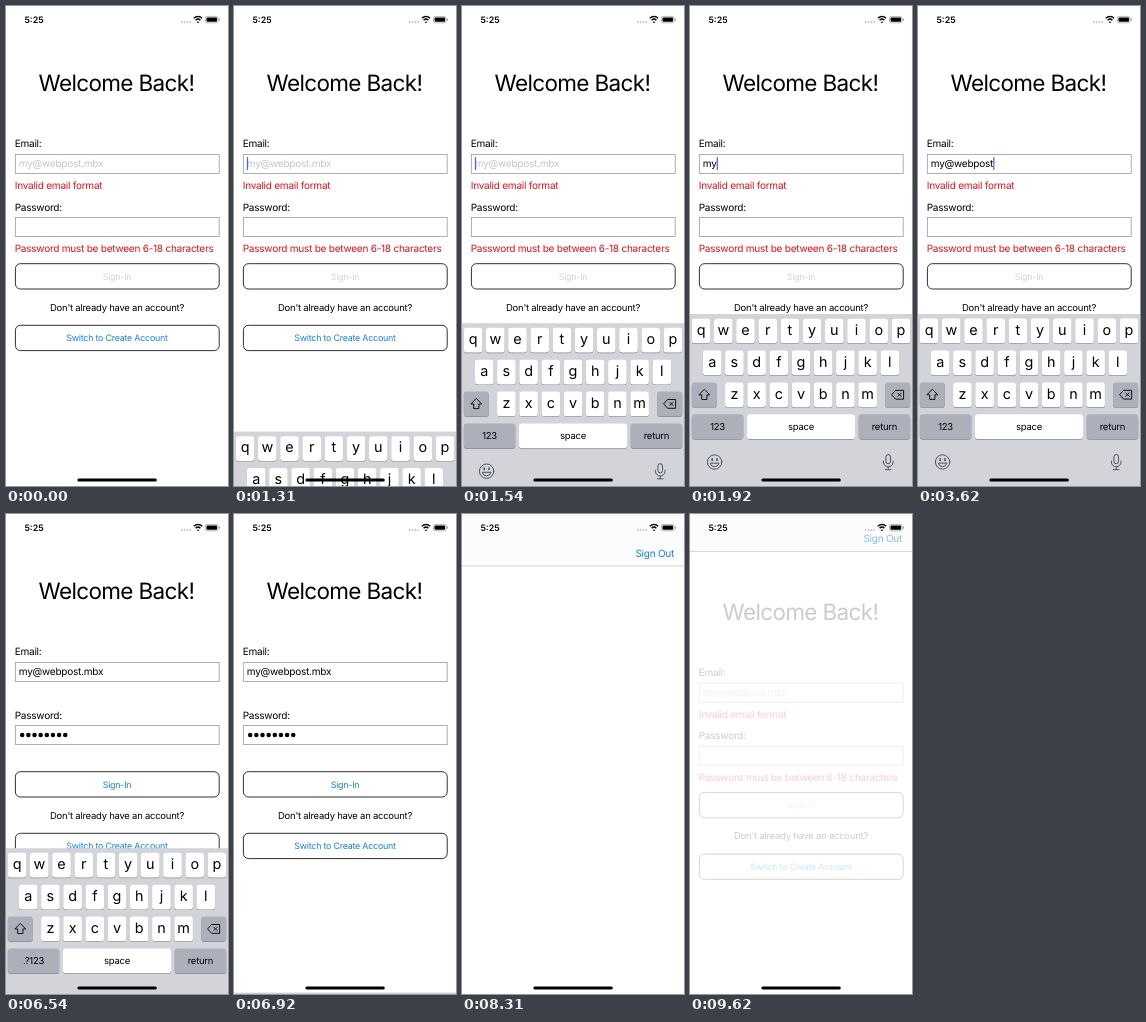
Animation, 222 px wide and 480 px high, one loop 9.7 s. Source, as an HTML page:

```html
<!DOCTYPE html>
<html lang="en">
<head>
<meta charset="utf-8">
<title>Sign-in form</title>
<style>
  html, body { margin: 0; width: 100%; height: 100%; overflow: hidden; background: #fff; }
  svg { display: block; width: 222px; height: 480px; }
  text {
    font: 10.06px Inter, sans-serif; letter-spacing: -.025em;
    white-space: pre; text-rendering: geometricPrecision;
  }
  .mid { text-anchor: middle; }
  .title { font-size: 22.5px; letter-spacing: -.029em; }
  .note { font-size: 9.47px; }
  .button { font-size: 8.88px; }
  .clock { font-size: 8.9px; font-weight: 600; letter-spacing: 0; }
  .letter { font-size: 14.4px; letter-spacing: 0; }
  .error { fill: #d8141e; }
  .blue { fill: #1580e0; }
  .field { fill: #fff; stroke: #a6a6a6; stroke-width: .9; }
  .outline { fill: #fff; stroke: #1a1a1a; stroke-width: .9; }
  .icon { fill: none; stroke: #111; stroke-width: 1; stroke-linejoin: round; }
  .tool { stroke: #50555c; stroke-linecap: round; }
</style>
</head>
<body>
<svg viewBox="0 0 222 480">
  <g id="form">
    <text class="title mid" x="110.4" y="85">Welcome Back!</text>
    <text x="8.7" y="141.3">Email:</text>
    <rect class="field" x="9.4" y="148.5" width="203.8" height="19"/>
    <text id="hint" x="12.8" y="161.2" fill="#c4c4c6"></text>
    <text id="email" x="12.8" y="161.2"></text>
    <text id="emailError" class="error" x="8.7" y="182.8">Invalid email format</text>
    <text x="8.7" y="204.5">Password:</text>
    <rect class="field" x="9.4" y="211.5" width="203.8" height="19"/>
    <g id="dots"></g>
    <text id="lastChar" y="224.3"></text>
    <text id="passError" class="error" x="8.7" y="245.8">Password must be between 6-18 characters</text>
    <rect class="outline" x="9.4" y="257.7" width="203.8" height="25.3" rx="5"/>
    <text id="signIn" class="button mid" x="111" y="273.6">Sign-In</text>
    <text class="note mid" x="111" y="304.7">Don't already have an account?</text>
    <rect class="outline" x="9.4" y="319.3" width="203.8" height="25.3" rx="5"/>
    <text class="button mid blue" x="111" y="335.2">Switch to Create Account</text>
    <g id="spinner" stroke="#777" stroke-width="2" stroke-linecap="round"></g>
    <rect id="caret" width="1.2" height="13" rx=".5" fill="#4468e0"/>
  </g>
  <g id="bar">
    <rect y="-40" width="222" height="92" fill="#fcfcfc"/>
    <path d="M0 52.2H222" stroke="#c6c6c8" stroke-width=".8"/>
    <text id="signOut" class="blue" x="173.4" y="43.2">Sign Out</text>
  </g>
  <text class="clock mid" x="28" y="16.8">5:25</text>
  <path d="M175 16h10" stroke="#aaa" stroke-width="1.3" stroke-dasharray="1.3 1.5"/>
  <g fill="none" stroke="#000">
    <path d="M187.9 12.3a5.8 5.8 0 0 1 8.2 0M189.6 14.2a3.4 3.4 0 0 1 4.8 0" stroke-width="1.5"/>
    <path d="M192 17.3l-1.2-1.3a1.7 1.7 0 0 1 2.4 0z" fill="#000" stroke="none"/>
    <rect x="199.4" y="10.4" width="12.8" height="6.4" rx="1.9" stroke="#999" stroke-width=".7"/>
    <rect x="200.5" y="11.5" width="10.6" height="4.2" rx="1" fill="#000" stroke="none"/>
    <path d="M213.5 12.6v2" stroke="#999"/>
  </g>
  <g id="keyboard"></g>
  <rect x="71.4" y="472.5" width="79.4" height="3" rx="1.5"/>
</svg>
<script>
const LOOP = 9700, ADDRESS = 'my@webpost.mbx', SECRET = 'password';
const FOCUS_EMAIL = 1150, FOCUS_PASS = 4380, SUBMIT = 7460, SIGN_OUT = 9500;
const DOT_PITCH = 6.15;
const emailTimes = [1770, 1920, 2230, 2540, 2690, 2920, 3080, 3230, 3380, 3540, 3690, 3770, 3850, 4000];
const passTimes = [4620, 4850, 5000, 5230, 5460, 5690, 5850, 6000];
const $ = id => document.getElementById(id);

// Critically damped spring from 0 to 1, as used for keyboard and bar
const spring = ms => {
  const x = Math.max(0, ms) * .0153;
  return 1 - (1 + x) * Math.exp(-x);
};
const smooth = x => {
  x = Math.min(1, Math.max(0, x));
  return x * x * (3 - 2 * x);
};
const typed = (times, t) => times.filter(s => s <= t).length;
const show = (id, on) => $(id).setAttribute('visibility', on ? 'visible' : 'hidden');
const moveY = (id, y) => $(id).setAttribute('transform', `translate(0 ${y.toFixed(2)})`);

function key(x, row, width, label = '', gray = false, id = '') {
  const y = 312.6 + 31.9 * row, single = label.length === 1;
  const box = (dy, fill) => `<rect x="${x}" y="${y + dy}" width="${width}" height="24.7" rx="2.9" fill="${fill}"/>`;
  return box(.7, '#898b90') + box(0, gray ? '#abb0ba' : '#fff') +
    `<text ${id && `id="${id}"`} class="mid ${single ? 'letter' : 'note'}" x="${x + width / 2}" y="${y + (single ? 16.2 : 15.5)}">${label}</text>`;
}

function buildKeyboard() {
  const rows = ['qwertyuiop', 'asdfghjkl', 'zxcvbnm'], starts = [1.8, 12.9, 35.1];
  const letters = rows.map((row, r) =>
    [...row].map((c, i) => key(starts[r] + 22.2 * i, r, 18.6, c)).join('')).join('');
  $('keyboard').innerHTML = '<rect y="308" width="222" height="172" fill="#d2d4da"/>' + letters +
    key(1.8, 2, 25, '', true) + key(195.2, 2, 25, '', true) +
    key(1.8, 3, 51.5, '123', true, 'modeKey') + key(57, 3, 108, 'space') + key(168.7, 3, 51.5, 'return', true) +
    `<path class="icon" d="M14.3 383.2l5.4 5.6h-2.8v4.6h-5.2v-4.6h-2.8z
      M201.6 388.7l4-4.4h8v8.8h-8zM207.6 386.8l3.8 3.8m0-3.8l-3.8 3.8"/>
    <g id="tools" class="icon tool"><circle cx="24.6" cy="456" r="7.2"/>
      <path d="M20.3 457.5a4.5 4.5 0 0 0 8.6 0z"/><path d="M22.2 452.8v1.6m4.8-1.6v1.6" stroke-width="1.6"/>
      <rect x="195.9" y="448.5" width="4.6" height="9.2" rx="2.3"/>
      <path d="M193.4 455v1a4.8 4.8 0 0 0 9.6 0v-1M198.2 460.8v2.8m-2.8 0h5.6"/></g>`;
}

function render(t) {
  const reset = t >= SIGN_OUT;
  const emailCount = reset ? 0 : typed(emailTimes, t);
  const passCount = reset ? 0 : typed(passTimes, t);

  $('email').textContent = ADDRESS.slice(0, emailCount);
  show('hint', !emailCount);
  show('emailError', emailCount < 13);

  const dots = passCount && t < 6380 ? passCount - 1 : passCount;
  [...$('dots').children].forEach((dot, i) => dot.setAttribute('visibility', i < dots ? 'visible' : 'hidden'));
  $('lastChar').textContent = SECRET.slice(dots, passCount);
  $('lastChar').setAttribute('x', 12.9 + DOT_PITCH * dots);
  show('passError', passCount < 6);
  $('signIn').setAttribute('fill', passCount >= 6 && t < SUBMIT ? '#1580e0' : '#d2d2d4');

  const onPass = t >= FOCUS_PASS;
  show('caret', t >= FOCUS_EMAIL && t < 6540);
  $('caret').setAttribute('y', onPass ? 214 : 151);
  $('caret').setAttribute('x', onPass
    ? 12.9 + DOT_PITCH * dots + (passCount > dots ? $('lastChar').getComputedTextLength() : 0)
    : 12.9 + (emailCount ? $('email').getComputedTextLength() : 0));

  moveY('keyboard', 172.5 * (1 - spring(t - 1236) + spring(t - 6496)));
  $('modeKey').textContent = onPass ? '.?123' : '123';
  show('tools', !onPass);

  show('spinner', t >= SUBMIT && !reset);
  const step = Math.max(0, Math.floor((t - 7610) / 80));
  $('spinner').setAttribute('transform', `translate(110.6 239.6) rotate(${45 * step})`);

  const back = smooth((t - 9520) / 350);
  $('form').setAttribute('opacity', reset ? back : 1 - smooth((t - 7900) / 350));
  moveY('form', reset ? 26 * (1 - back) : 0);

  const bar = spring(t - 7876) - spring(t - 9496);
  moveY('bar', 26 * (bar - 1));
  $('bar').setAttribute('opacity', Math.min(1, 2 * bar));
  $('signOut').setAttribute('opacity', t >= 9310 ? .6 : 1);
}

buildKeyboard();
$('hint').textContent = ADDRESS;
$('dots').innerHTML = [...SECRET].map((_, i) =>
  `<circle cx="${16.2 + DOT_PITCH * i}" cy="221" r="2.25"/>`).join('');
$('spinner').innerHTML = Array.from({ length: 8 }, (_, i) =>
  `<path d="M0-5V-9" transform="rotate(${45 * i})" opacity="${.25 + .09 * i}"/>`).join('');

const start = performance.now();
function frame() {
  render((performance.now() - start) % LOOP);
  requestAnimationFrame(frame);
}
frame();
</script>
</body>
</html>
```
